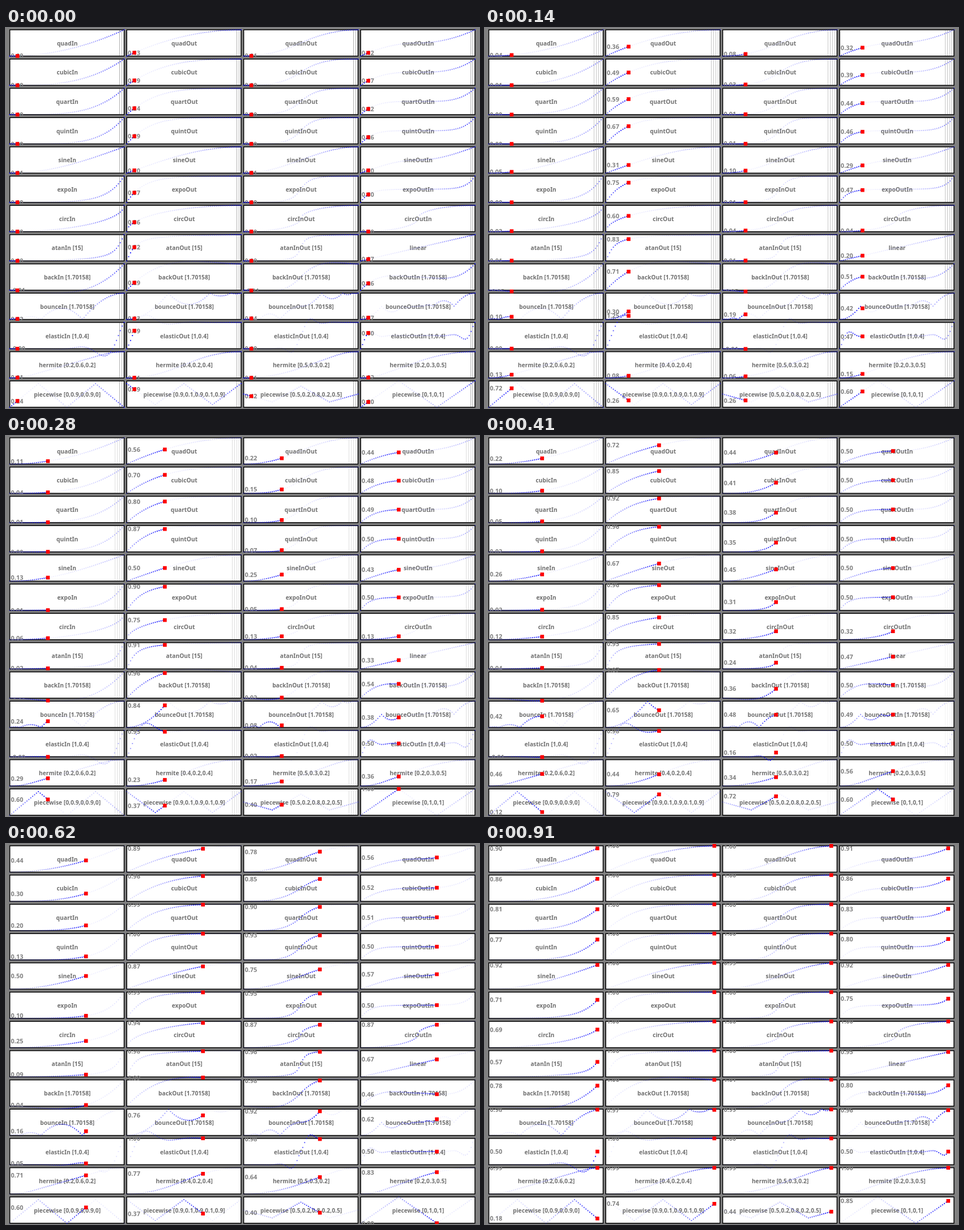
Write an HTML page with a canvas that moves like this. It is 835 px wide and 671 px high and loops after 980 ms.

```html
<!DOCTYPE html>
<html lang="en">
<head>
<meta charset="utf-8">
<title>Easing curves</title>
<style>
  html, body { margin: 0; width: 100%; height: 100%; overflow: hidden; background: #808080; }
  svg, canvas { position: absolute; left: 0; top: 0; display: block; }
  rect { fill: #fff; stroke: #000; stroke-width: 1.5px; }
  text { font: bold 10.25px "Noto Sans", "DejaVu Sans", sans-serif; fill: #707070; }
  .label { text-anchor: middle; }
  .value { font-size: 11px; fill: #808080; }
</style>
</head>
<body>
<svg id="grid" width="835" height="671" viewBox="0 0 835 671"></svg>
<canvas id="plot" width="835" height="671"></canvas>
<script>
const STEPS = 60, LOOP = 980;
const PITCH_X = 206.45, PITCH_Y = 51.67, BOX_W = 201.8, BOX_H = 46.4;
const TICKS = [0, 70, 140, 210, 280, 340, 410, 480, 550, 620, 690, 760, 830, 910];

// Ease-in and ease-out bases
const power = n => t => t ** n;
const sine = t => 1 - Math.cos(t * Math.PI / 2);
const expo = t => t === 0 ? 0 : 2 ** (10 * (t - 1));
const circ = t => 1 - Math.sqrt(1 - t * t);
const back = s => t => t * t * ((s + 1) * t - s);
const atanOut = k => t => Math.atan(k * t) / Math.atan(k);
const elasticOut = (a, p) => t =>
  t === 0 ? 0 : 1 + a * 2 ** (-10 * t) * Math.sin((t - p / 4) * 2 * Math.PI / p);
const bounceOut = s => t => {
  const u = t * 2.75;
  if (u < 1) return u * u;
  const [mid, dip] = u < 2 ? [1.5, 0.25] : u < 2.5 ? [2.25, 0.0625] : [2.625, 0.015625];
  return 1 + s * ((u - mid) ** 2 - dip);
};

// Speeds up during a, cruises during b, slows down during c
const hermite = (a, b, c) => t => {
  const v = 1 / (a / 2 + b + c / 2);
  if (t < a) return v * t * t / (2 * a);
  if (t < a + b) return v * (t - a / 2);
  return 1 - v * (1 - t) ** 2 / (2 * c);
};
const piecewise = (...p) => t => {
  const x = t * (p.length - 1), i = Math.min(Math.floor(x), p.length - 2);
  return p[i] + (p[i + 1] - p[i]) * (x - i);
};

const flip = f => t => 1 - f(1 - t);
const join = (f, g) => t => t < 0.5 ? f(2 * t) / 2 : 0.5 + g(2 * t - 1) / 2;

function family(name, fin, args = "") {
  const out = flip(fin), tag = args && ` [${args}]`;
  return [
    [name + "In" + tag, fin],
    [name + "Out" + tag, out],
    [name + "InOut" + tag, join(fin, out)],
    [name + "OutIn" + tag, join(out, fin)]
  ];
}
const withArgs = (name, make, lists) => lists.map(a => [`${name} [${a}]`, make(...a)]);

const circRow = family("circ", circ);
circRow[3][1] = circRow[2][1];
const atanRow = family("atan", flip(atanOut(15)), "15");
atanRow[3] = ["linear", t => t];

const curves = [
  ...["quad", "cubic", "quart", "quint"].flatMap((name, i) => family(name, power(i + 2))),
  ...family("sine", sine),
  ...family("expo", expo),
  ...circRow,
  ...atanRow,
  ...family("back", back(1.70158), "1.70158"),
  ...family("bounce", flip(bounceOut(1.70158)), "1.70158"),
  ...family("elastic", flip(elasticOut(1, 0.4)), "1,0.4"),
  ...withArgs("hermite", hermite, [[0.2, 0.6, 0.2], [0.4, 0.2, 0.4], [0.5, 0.3, 0.2], [0.2, 0.3, 0.5]]),
  ...withArgs("piecewise", piecewise,
    [[0, 0.9, 0, 0.9, 0], [0.9, 0.1, 0.9, 0.1, 0.9], [0.5, 0.2, 0.8, 0.2, 0.5], [0, 1, 0, 1]])
];

const grid = document.getElementById("grid");
const ctx = document.getElementById("plot").getContext("2d");

function add(tag, attrs, content = "") {
  const el = document.createElementNS("http://www.w3.org/2000/svg", tag);
  for (const key in attrs) el.setAttribute(key, attrs[key]);
  el.textContent = content;
  grid.append(el);
  return el;
}

// Each box covers text that hangs down from the row above
const cells = curves.map(([name, ease], i) => {
  const x = 6.7 + (i % 4) * PITCH_X, y = 3.2 + Math.floor(i / 4) * PITCH_Y;
  add("rect", { x, y, width: BOX_W, height: BOX_H });
  add("text", { class: "label", x: x + BOX_W / 2 + 0.6, y: y + 27.6 }, name);
  return {
    ease, x, y,
    value: add("text", { class: "value", x: x + 1.8 }),
    px: n => x + BOX_W * n / STEPS,
    py: n => y + BOX_H * (1 - ease(n / STEPS))
  };
});

function square(x, y, size) {
  ctx.fillRect(x - size / 2, y - size / 2, size, size);
}

function drawCell(c, step) {
  // Fading bars left at the right edge after a restart
  if (step < 32) {
    ctx.fillStyle = "#000";
    ctx.globalAlpha = 0.35 * (1 - step / 32);
    const bars = step < 8 ? 2 : 4;
    for (let k = 1; k <= bars; k++)
      ctx.fillRect(Math.floor(c.x + BOX_W - 3.9 * k), c.y + 0.75, 1, BOX_H - 1.5);
  }
  ctx.fillStyle = "#00f";
  for (let i = 0; i <= STEPS; i++) {
    const age = i <= step ? step - i : step + STEPS - i;
    ctx.globalAlpha = 0.95 ** age;
    square(c.px(i), c.py(i), 1.9);
  }
  ctx.globalAlpha = 1;
  ctx.fillStyle = "#f00";
  square(c.px(step), c.py(step), 6.6);
  c.value.textContent = (c.ease(step / STEPS) + 1e-9).toFixed(2);
  c.value.setAttribute("y", c.py(step) + 4.1);
}

let shown = -1;
function render() {
  const now = performance.now() % LOOP;
  const tick = TICKS.filter(t => t <= now).length;
  const step = tick === TICKS.length ? 57 : tick * 4;
  if (step !== shown) {
    shown = step;
    ctx.clearRect(0, 0, 835, 671);
    for (const c of cells) drawCell(c, step);
  }
  requestAnimationFrame(render);
}
render();
</script>
</body>
</html>
```
